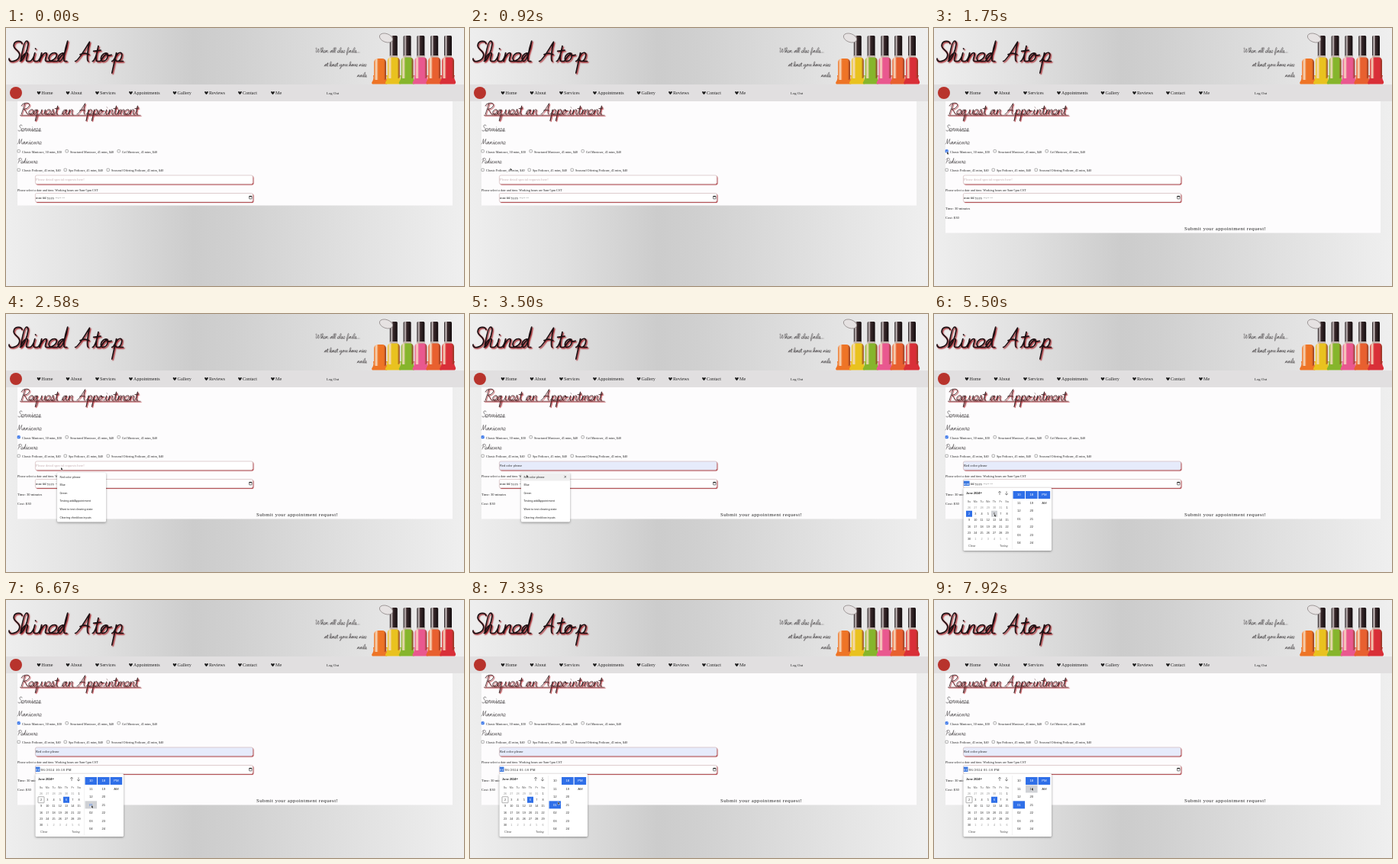
An HTML page with a canvas for the animation above (8 s loop, 600 px wide and 338 px high).

```html
<!DOCTYPE html>
<html lang="en">
<head>
<meta charset="utf-8">
<title>Request an Appointment</title>
<style>
html, body { margin: 0; width: 100%; height: 100%; overflow: hidden; background: #ddd; }
canvas { display: block; }
</style>
</head>
<body>
<canvas id="stage" width="600" height="338"></canvas>
<script>
const ctx = document.getElementById('stage').getContext('2d');
const LOOP = 8000;
const SERIF = '"Liberation Serif", serif';
const SANS = '"Liberation Sans", sans-serif';
const UI = '"Noto Sans", sans-serif';
const BLUE = '#2f6fe8';

// Pen strokes for the handwriting: each letter starts and ends on the baseline.
const UP = 'c2 0 4-6 4-10';
const DOWN = 'c-1 6-1 10 1 10';
const BOWL = 'c2 0 3-8 7-9c-3-2-6 2-6 5c0 2.5.8 4 2 4';
const RISE = 'c2.5 0 4.5-5 4.5-10';
const STEM = 'c2 0 3.5-6 3.5-10l-1 10';
const ARCH = 'c.5-5 3-10 5-10c2.2 0 .5 5 .5 8c0 1.5.5 2 1.5 2';
const LOOPED = 'c3 0 6-12 6-20c0-3-1-4-2-4';
const CAP_BOWL = 'm3 0c1-8 3-16 4-22m-6 4c2-8 16-8 14 0';
const CUP = UP + 'c-1 6-1 10 1.5 10c3 0 4.5-6 4.5-10';
const pen = {
  a: BOWL + RISE + DOWN,
  c: 'c2 0 3-8 7-9c-3-2-6 2-6 5c0 2.5 1.2 4 3 4h2.5',
  d: BOWL + 'c3 0 5.5-14 5.5-24c-2 12-2.5 24-.5 24',
  e: 'c4 0 7-4 7-7c0-2-1-3-2.5-3c-3 0-5 3-5 6c0 2.5 1.5 4 4 4h2',
  f: LOOPED + 'c-2 0-3 10-3.5 34c0 4 2 3 2-1c0-4 .5-9 1-9h2',
  h: LOOPED + 'c-2 0-3 8-3.5 24' + ARCH,
  i: UP + DOWN + 'm-1-15l.4.4m.6 14.6',
  l: LOOPED + 'c-2 0-3 8-3 18c0 4 1 6 2.5 6',
  m: STEM + 'c.5-5 3-10 4.5-10c2.2 0 .2 6-.3 10' + ARCH,
  n: STEM + ARCH,
  o: BOWL + 'c3 0 4.5-3 4.5-6c0-2-1-3.5-2.5-3.5c1 2.5 4 3 6 2m-1 7.5',
  p: 'c2 0 3.5-6 3.5-10l-2 24l1.5-18c.5-4 3-7 5-6c2 1 1.5 10-2.5 10c-1.5 0-2-1-2-2m2 2h3.5',
  q: BOWL + RISE + 'l-1.5 24c2 0 3-8 3-14h1.5',
  r: 'c2 0 3-6 3-11c0 2 4 1 4 1c-1.5 4-1.5 10 .5 10',
  s: 'c2 0 4.5-7 5-11c0 3 2 5 2 8c0 2-2 3-3.5 3c-1 0-1.5-.5-1.5-1m1 1h4.5',
  t: 'c2 0 4-10 4-18c-1 10-1.5 18 .8 18m-5-12l7-1m-2 13',
  u: CUP + DOWN,
  v: 'c1-1 1-9 3-10c1 0 0 10 2 10c2.5 0 3.5-6 3-10c.5 1.5 1 1.5 2 1c0 4-.5 9 .5 9',
  y: CUP + 'l-2 20c-.5 4-3 4-4 3c-1-3 5-9 8-13',
  A: 'c3 0 8-14 12-23c-1 8-1 23 1 23m-9-8c3-2 6-2 9 0m2 8',
  M: 'c3 0 4-14 5-22c1 6 1 14 2 22c2-8 4-16 7-22c0 6-1 22 2 22',
  P: CAP_BOWL + 'c-1 6-6 8-9 8m6 10',
  R: CAP_BOWL + 'c-1 5-6 7-9 7c3 0 5 11 9 11',
  S: 'm2-3c0 6 10 3 10-4c0-6-7-7-7-12c0-6 7-6 8-2m-2 21',
  W: 'm0-20c3-5 5-2 4 6c-1 8-1 14 1 14c3 0 6-10 7-18c-1 10-1 18 1 18c4 0 8-12 8-20c0-3 2-3 3-1m-2 21',
  '.': 'm1 0h.3m1.7 0',
  ' ': 'm6 0'
};

function script(text, x, y, size, weight, gap, color = '#3c383a') {
  const join = ch => /[a-np-z]/.test(ch) ? `h${gap}` : `m${gap} 0`;
  const letters = new Path2D('M0 0' + [...text].map(ch => pen[ch] + join(ch)).join(''));
  const path = new Path2D();
  path.addPath(letters, new DOMMatrix([1.2 * size, 0, -0.12 * size, size, x, y]));
  ctx.lineWidth = weight;
  ctx.lineCap = ctx.lineJoin = 'round';
  ctx.strokeStyle = color;
  ctx.stroke(path);
  ctx.lineCap = 'butt';
  ctx.lineJoin = 'miter';
}

function text(str, x, y, size, color = '#222', family = SERIF, align = 'left', style = '') {
  ctx.font = `${style} ${size}px ${family}`;
  ctx.textAlign = align;
  ctx.fillStyle = color;
  ctx.fillText(str, x, y);
}

function rect(x, y, w, h, color) {
  ctx.fillStyle = color;
  ctx.fillRect(x, y, w, h);
}

function round(x, y, w, h, r, fill, stroke) {
  ctx.beginPath();
  ctx.roundRect(x, y, w, h, r);
  if (fill) { ctx.fillStyle = fill; ctx.fill(); }
  if (stroke) { ctx.strokeStyle = stroke; ctx.lineWidth = 0.6; ctx.stroke(); }
}

function shadowed(color, dx, dy, blur, draw) {
  ctx.save();
  ctx.shadowColor = color;
  ctx.shadowOffsetX = dx;
  ctx.shadowOffsetY = dy;
  ctx.shadowBlur = blur;
  draw();
  ctx.restore();
}

function line(points, color, width) {
  ctx.beginPath();
  points.forEach(([x, y]) => ctx.lineTo(x, y));
  ctx.strokeStyle = color;
  ctx.lineWidth = width;
  ctx.stroke();
}

function gradient(x0, x1, stops) {
  const g = ctx.createLinearGradient(x0, 0, x1, 0);
  stops.forEach(([at, color]) => g.addColorStop(at, color));
  return g;
}

function heart(x, y) {
  ctx.beginPath();
  ctx.moveTo(x, y + 2.2);
  ctx.bezierCurveTo(x - 4.2, y - 0.8, x - 1.6, y - 3.4, x, y - 1);
  ctx.bezierCurveTo(x + 1.6, y - 3.4, x + 4.2, y - 0.8, x, y + 2.2);
  ctx.fillStyle = '#1c1c1c';
  ctx.fill();
}

function bottles() {
  const colors = ['#ee7426', '#e9c21f', '#86b52c', '#e9588f', '#e8602f', '#d92f38'];
  colors.forEach((color, i) => {
    const x = 482 + i * 17.8;
    const y = i ? 38 : 40;
    ctx.fillStyle = color;
    ctx.beginPath();
    ctx.moveTo(x - 1, 62);
    ctx.bezierCurveTo(x + 1, 70, x - 5, 71, x - 2, 73.5);
    ctx.lineTo(x + 17, 73.5);
    ctx.bezierCurveTo(x + 21, 70, x + 14, 68, x + 17, 62);
    ctx.fill();
    round(x, y, 16, 28, [5, 5, 2, 2], gradient(x, x + 16, [[0, color], [0.2, '#f6dcc2'], [0.36, color], [0.8, color], [1, '#8e3a22']]));
    if (!i) return;
    round(x + 3, 10, 10, 28, 1.5, gradient(x + 3, x + 13, [[0, '#1b1416'], [0.25, '#d2c8c8'], [0.42, '#3a2a2c'], [1, '#140d0f']]));
    rect(x + 3, 36, 10, 2.5, '#c4b4ac');
  });
  ctx.beginPath();
  ctx.ellipse(498, 13, 9, 5.5, 0.35, 0, 7);
  ctx.fillStyle = '#e6e2e2';
  ctx.fill();
  ctx.strokeStyle = '#8c8484';
  ctx.lineWidth = 0.8;
  ctx.stroke();
}

function header() {
  rect(0, 0, 600, 338, gradient(0, 600, [[0, '#eeeeee'], [0.2, '#e0e0e0'], [0.41, '#cccccc'], [0.5, '#d0d0d0'], [0.75, '#e0e0e0'], [1, '#efefef']]));
  shadowed('#a8262c', 1.3, 1.3, 1.5, () => script('Shined Atop', 1, 43.5, 1.1, 1.7, 2.2, '#1d1013'));
  script('When all else fails...', 405, 32, 0.27, 0.5, 2);
  script('at least you have nice', 417, 50, 0.25, 0.5, 1.1);
  script('nails', 460, 64, 0.25, 0.5, 1.6);
  bottles();
  rect(0, 74, 600, 22, '#e1dfe0');
  ctx.beginPath();
  ctx.arc(13, 85, 8, 0, 7);
  ctx.fillStyle = '#b8332c';
  ctx.fill();
  const links = { Home: 43, About: 81, Services: 119.5, Appointments: 163.5, Gallery: 221, Reviews: 262.5, Contact: 306.5, Me: 349.5 };
  for (const [label, x] of Object.entries(links)) {
    heart(x, 85);
    text(label, x + 3.5, 87, 6.1);
  }
  text('Log Out', 420, 86.5, 4.8);
}

function checkbox(x, y, label, labelX, checked) {
  round(x, y, 3.4, 3.4, 0.6, checked ? BLUE : '#fff', checked ? BLUE : '#777');
  if (checked) line([[x + 0.7, y + 1.7], [x + 1.4, y + 2.5], [x + 2.8, y + 0.8]], '#fff', 0.6);
  text(label, labelX, y + 4, 4.1);
}

function field(y, fill) {
  shadowed('#a5232a', 1, 1, 1, () => round(38.4, y, 285, 11.4, 2, fill));
  round(38.4, y, 285, 11.4, 2, null, '#cbb0b3');
}

function form(t) {
  const picked = t >= 1670, filled = t >= 3580, preview = t >= 3000;
  rect(15, 96, 570, picked ? 172.5 : 136.5, '#fdfcfd');
  shadowed('#b3262e', 1.1, 1.1, 1, () => {
    script('Request an Appointment', 18, 113, 0.62, 0.85, 1, '#3a2023');
    line([[18, 114.3], [176.5, 114.3]], '#5a2529', 0.7);
  });
  script('Services', 15, 135, 0.34, 0.6, 2.1);
  script('Manicure', 15, 152, 0.3, 0.5, 2.2);
  script('Pedicure', 15, 177, 0.27, 0.5, 2.5);
  checkbox(15, 159.6, 'Classic Manicure, 30 mins, $30', 21, picked);
  checkbox(78, 159.6, 'Structured Manicure, 45 mins, $40', 84);
  checkbox(146, 159.6, 'Gel Manicure, 45 mins, $40', 152);
  checkbox(15, 184.2, 'Classic Pedicure, 45 mins, $40', 21);
  checkbox(76, 184.2, 'Spa Pedicure, 45 mins, $40', 82);
  checkbox(132, 184.2, 'Seasonal Offering Pedicure, 45 mins, $40', 138);

  field(193, preview ? '#e6ebfb' : '#fff');
  if (filled) text('Red color please', 39, 200.3, 4.6);
  else if (preview) text('Red color please', 39, 200.2, 3.9, '#333', SANS);
  else text('Please detail special requests here!', 39, 200.3, 4.6, '#c3a9ad');

  text('Please select a date and time. Working hours are 9am-5pm CST', 15, 214, 4.15);
  field(216.5, '#fff');
  dateValue(t);
  round(318.6, 220.3, 3.4, 3.6, 0.3, null, '#222');
  rect(318.6, 220, 3.4, 1.2, '#222');

  if (picked) {
    text('Time: 30 minutes', 15, 238, 4.6);
    text('Cost: $30', 15, 250, 4.6);
    ctx.letterSpacing = '0.4px';
    text('Submit your appointment request!', 328, 265.2, 6.9);
    ctx.letterSpacing = '0px';
  }
}

function dateValue(t) {
  const open = t >= 5000, dated = t >= 5900;
  const hour = t >= 7000 ? '01' : '10';
  ctx.letterSpacing = dated ? '0.35px' : '0.1px';
  const month = dated ? '06' : 'mm';
  ctx.font = `4.6px ${SERIF}`;
  const width = ctx.measureText(month).width;
  if (open) rect(38.8, 218.6, width + 0.4, 6.4, '#3b78e0');
  text(month, 39, 223.8, 4.6, open ? '#fff' : '#222');
  text(dated ? `/06/2024 ${hour}:18 PM` : '/dd/yyyy --:-- --', 39 + width, 223.8, 4.6);
  ctx.letterSpacing = '0px';
}

function popup(x, y, w, h) {
  shadowed('rgba(0,0,0,.4)', 0, 1, 3, () => round(x, y, w, h, 1.5, '#fff'));
}

function suggestions(t) {
  if (t < 2580 || t >= 3580) return;
  popup(67, 208, 64, 64.5);
  if (t >= 3000) {
    rect(67, 208.5, 64, 10, '#efefef');
    line([[123.4, 212], [126, 214.6]], '#333', 0.6);
    line([[126, 212], [123.4, 214.6]], '#333', 0.6);
  }
  ['Red color please', 'Blue', 'Green', 'Testing addAppointment', 'Want to test clearing state', 'Clearing checkbox inputs']
    .forEach((label, i) => text(label, 70.5, 214.8 + i * 10.55, 3.5, '#222', UI, 'left', '500'));
}

function cell(label, x, y, w, h, state, color = '#333') {
  if (state === 'on') rect(x - w / 2, y - h / 2, w, h, BLUE);
  if (state === 'hover') rect(x - w / 2, y - h / 2, w, h, '#cfd1d5');
  if (state === 'today') round(x - w / 2, y - h / 2, w, h, 0.5, null, '#777');
  text(label, x, y + 1.4, w > 10 ? 4.3 : 3.8, state === 'on' ? '#fff' : color, SANS, 'center');
}

function picker(t) {
  if (t < 5000) return;
  const dated = t >= 5900, hourSet = t >= 7000;
  popup(38.5, 227.5, 115.5, 82.5);
  text('June 2024', 42, 236, 3.8, '#222', SANS, 'left', 'bold');
  ctx.beginPath();
  ctx.moveTo(60.4, 233.7);
  ctx.lineTo(62.8, 233.7);
  ctx.lineTo(61.6, 235.3);
  ctx.fill();
  [[86, -1], [95, 1]].forEach(([x, d]) => {
    line([[x, 234.7 - d * 2.4], [x, 234.7 + d * 2.4]], '#444', 0.6);
    line([[x - 1.9, 234.7 + d * 0.6], [x, 234.7 + d * 2.4], [x + 1.9, 234.7 + d * 0.6]], '#444', 0.6);
  });
  const column = i => 46 + i * 8.25;
  ['Su', 'Mo', 'Tu', 'We', 'Th', 'Fr', 'Sa'].forEach((day, i) => text(day, column(i), 247, 3.7, '#555', SANS, 'center'));
  for (let i = 0; i < 42; i++) {
    const n = i - 5;
    const label = n < 1 ? n + 31 : n > 30 ? n - 30 : n;
    let state = '';
    if (n === 2) state = dated ? 'today' : 'on';
    if (n === 6) state = dated ? 'on' : t >= 5400 ? 'hover' : '';
    cell(label, column(i % 7), 253.5 + Math.floor(i / 7) * 8.25, 8, 8, state, n < 1 || n > 30 ? '#999' : '#333');
  }
  text('Clear', 45, 305, 4, '#555', SANS);
  text('Today', 86, 305, 4, '#555', SANS);
  line([[102.5, 230], [102.5, 308]], '#e6e6e6', 0.5);

  const row = i => 237 + i * 10.45;
  for (let i = 0; i < 7; i++) {
    const hour = String((9 + i) % 12 + 1).padStart(2, '0');
    let state = i === (hourSet ? 3 : 0) ? 'on' : '';
    if (i === 3 && !hourSet && t >= 6500) state = 'hover';
    cell(hour, 111.3, row(i), 15.5, 10, state, state === 'hover' ? BLUE : '#333');
    const minute = i === 0 ? 'on' : i === 1 && t >= 7600 ? 'hover' : '';
    cell(18 + i, 127.8, row(i), 15.5, 10, minute);
  }
  cell('PM', 144.4, row(0), 15.5, 10, 'on');
  cell('AM', 144.4, row(1), 15.5, 10, '');
}

const route = [
  [420, 150, 228], [1170, 19, 168], [1500, 17, 162], [1850, 17, 162], [2420, 72, 201], [2700, 72, 201],
  [3000, 74, 206], [3600, 74, 211], [4580, 305, 226], [4800, 320, 222], [5050, 320, 222],
  [5420, 79, 262], [5950, 79, 262], [6550, 112, 269], [7200, 112, 269], [7650, 128, 246], [8000, 128, 246]
];

function cursor(t) {
  if (t < route[0][0]) return;
  const next = route.findIndex(stop => stop[0] > t);
  const [t0, x0, y0] = route[next - 1], [t1, x1, y1] = route[next];
  const p = (t - t0) / (t1 - t0), k = p * p * (3 - 2 * p);
  ctx.save();
  ctx.translate(x0 + (x1 - x0) * k, y0 + (y1 - y0) * k);
  ctx.beginPath();
  [[0, 0], [0, 3.6], [0.9, 2.8], [1.5, 4.1], [2, 3.8], [1.4, 2.6], [2.6, 2.6]].forEach(([x, y]) => ctx.lineTo(x, y));
  ctx.closePath();
  ctx.strokeStyle = '#fff';
  ctx.lineWidth = 0.7;
  ctx.stroke();
  ctx.fillStyle = '#333';
  ctx.fill();
  ctx.restore();
}

function frame(now) {
  const t = now % LOOP;
  header();
  form(t);
  suggestions(t);
  picker(t);
  cursor(t);
  requestAnimationFrame(frame);
}
requestAnimationFrame(frame);
</script>
</body>
</html>
```
